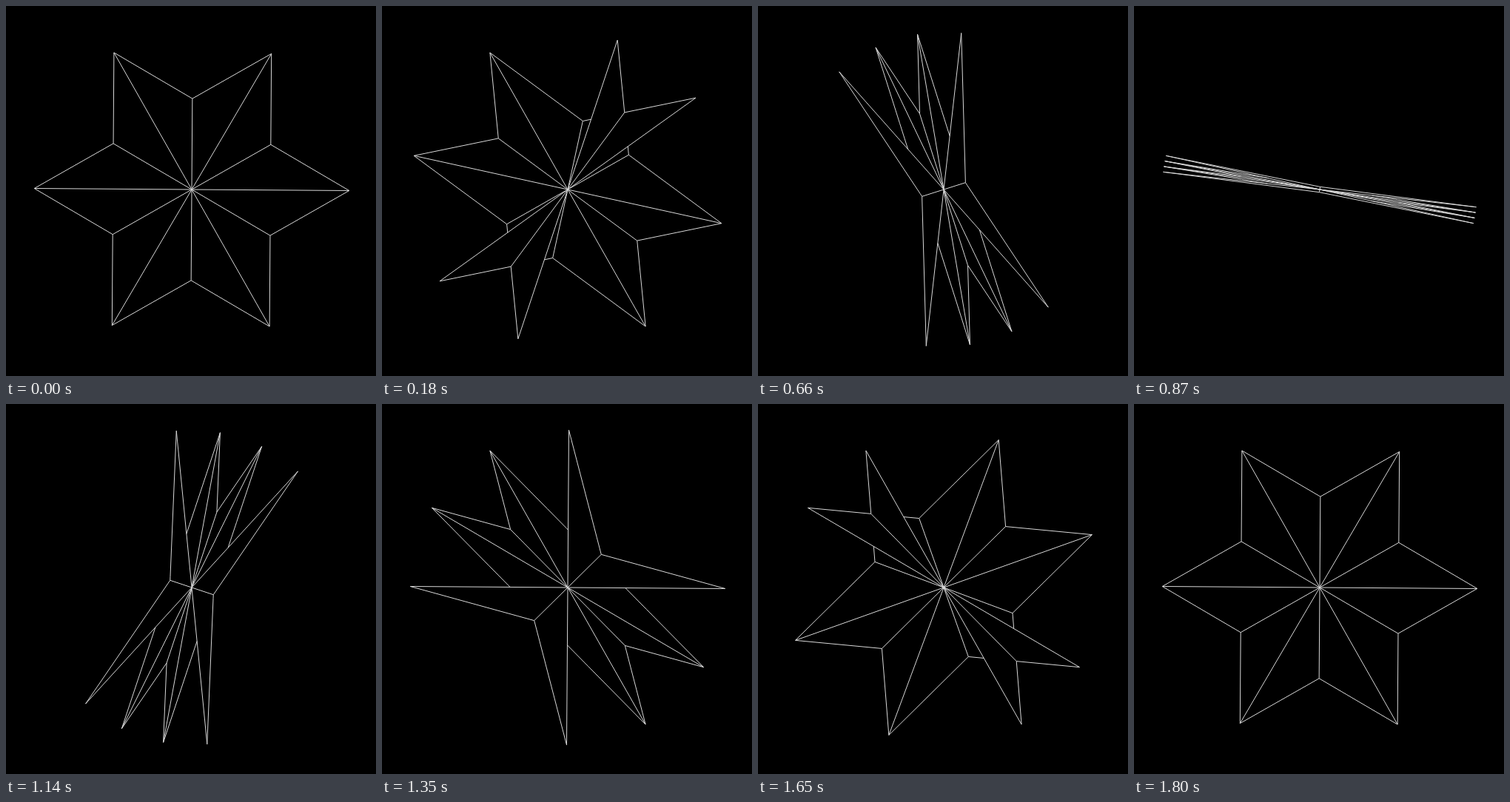
Write an HTML page with a canvas that moves like this. It is 500 by 500 pixels and loops after 1.83 s.

```html
<!DOCTYPE html>
<html lang="en">
<head>
<meta charset="utf-8">
<title>Folding star</title>
<style>
html, body { margin: 0; width: 100%; height: 100%; overflow: hidden; background: #000; }
canvas { display: block; }
</style>
</head>
<body>
<canvas id="stage" width="500" height="500"></canvas>
<script>
const ctx = document.getElementById('stage').getContext('2d');
const CX = 251, CY = 248, R = 212.8;
const STEP = 30, STEPS = 61;
const cos = deg => Math.cos(deg * Math.PI / 180);
const sin = deg => Math.sin(deg * Math.PI / 180);
const mod = deg => ((deg % 360) + 360) % 360;

// Three turning bow ties: each has two triangular facets spanning 180 - spread
// degrees. At every angle only the facet reaching farthest out is visible.
function draw(step) {
  const spread = Math.max(Math.abs(60 - 2 * step), 0.01);
  const axis = 89.6 + 9 * step;
  const normals = [];
  for (const j of [-1, 0, 1]) {
    normals.push(axis + j * spread + 90, axis + j * spread + 270);
  }
  const low = sin(spread / 2);
  const reach = (n, a) => R * low / cos(a - n);

  function visible(a) {
    let best = null, least = 2;
    for (const n of normals) {
      const c = cos(a - n);
      if (c >= low && c < least) { least = c; best = n; }
    }
    return best;
  }

  // Angles where the visible facet may change: tips and facet crossings.
  const breaks = [];
  normals.forEach((n, i) => {
    breaks.push(n + 90 - spread / 2, n - 90 + spread / 2);
    for (const m of normals.slice(i + 1)) breaks.push((n + m) / 2, (n + m) / 2 + 180);
  });
  const angles = breaks.map(mod).sort((a, b) => a - b);
  const parts = [];
  angles.forEach((from, i) => {
    const to = i + 1 < angles.length ? angles[i + 1] : angles[0] + 360;
    if (to - from < 1e-6) return;
    const facet = visible((from + to) / 2);
    if (facet !== null) parts.push({ from, to, facet });
  });

  const move = (r, a) => ctx.moveTo(CX + r * cos(a), CY - r * sin(a));
  const line = (r, a) => ctx.lineTo(CX + r * cos(a), CY - r * sin(a));
  ctx.fillStyle = '#000';
  ctx.fillRect(0, 0, 500, 500);
  ctx.beginPath();
  parts.forEach(({ from, to, facet }, i) => {
    const before = parts[(i + parts.length - 1) % parts.length].facet;
    const start = reach(facet, from);
    if (facet !== before) {
      ctx.moveTo(CX, CY);
      line(Math.max(start, reach(before, from)), from);
    }
    if (facet !== before || i === 0) move(start, from);
    line(reach(facet, to), to);
  });
  ctx.strokeStyle = '#d8d8d8';
  ctx.lineWidth = 1;
  ctx.lineJoin = 'bevel';
  ctx.stroke();
}

const begin = performance.now();
function frame() {
  draw(Math.floor((performance.now() - begin) / STEP) % STEPS);
  requestAnimationFrame(frame);
}
frame();
</script>
</body>
</html>
```
